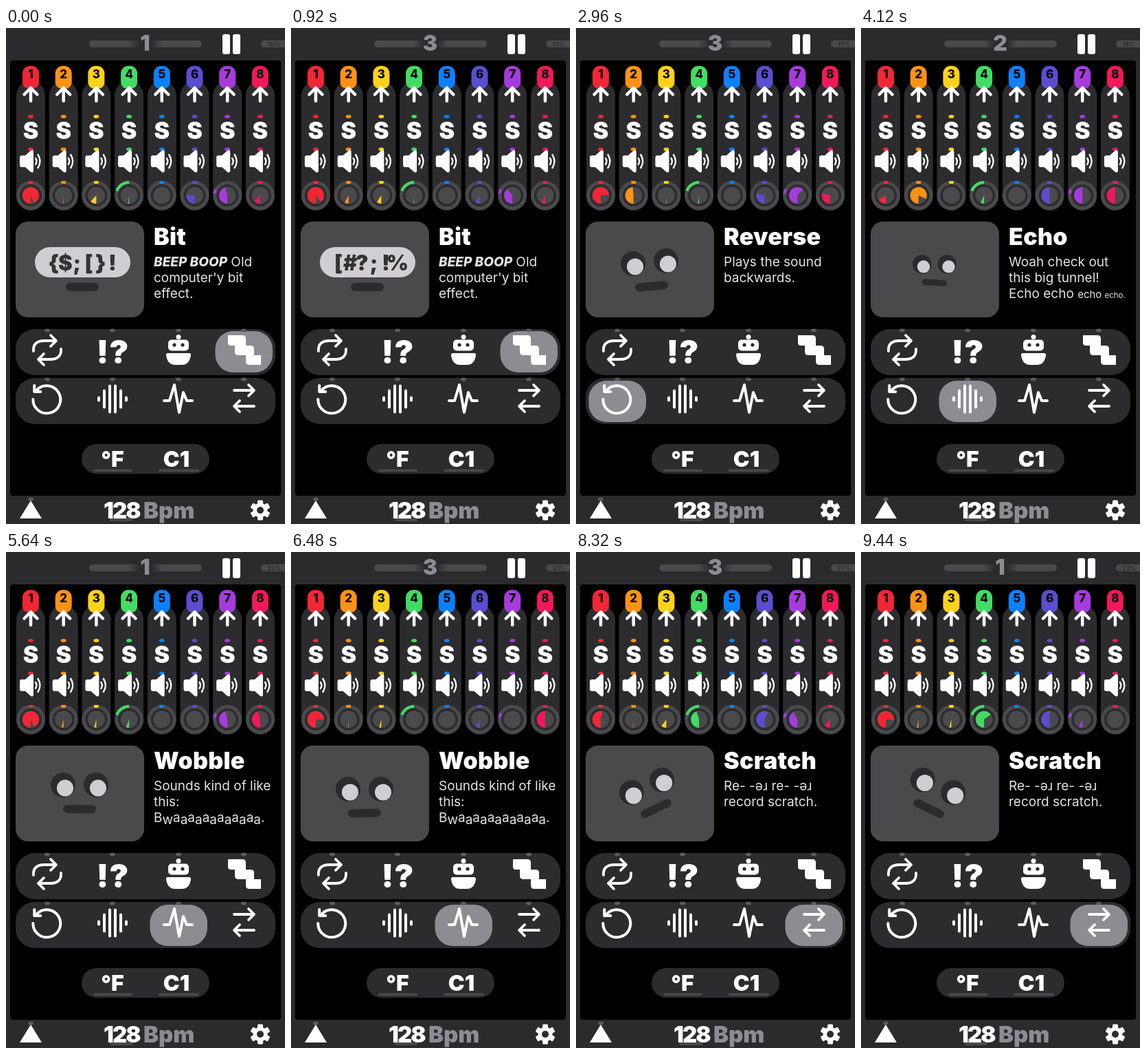
An HTML page with a canvas that plays this animation: 406 px wide and 720 px high, repeating every 9480 ms.

```html
<!DOCTYPE html>
<html lang="en">
<head>
<meta charset="utf-8">
<title>Voice effects mixer</title>
<style>
  html, body { margin: 0; width: 100%; height: 100%; overflow: hidden; background: #2b2b2d; }
  canvas { display: block; width: 406px; height: 720px; }
</style>
</head>
<body>
<canvas id="stage"></canvas>
<script>
const canvas = document.getElementById('stage');
const ratio = window.devicePixelRatio || 1;
canvas.width = 406 * ratio;
canvas.height = 720 * ratio;
const c = canvas.getContext('2d');

const LOOP = 9480, STEP = 40, BEAT = 60000 / 128, LEAD = 120, FLASH = 115;
const PANEL = '#2c2c2e', GREY = '#4a494c', DARK = '#2b2b2d', LIGHT = '#8e8c93', PALE = '#d0ced3';
const COLORS = ['#f22735', '#ff9215', '#ffd21a', '#43dc63', '#0d80ff', '#5b4dd0', '#a63bdd', '#f0195a'];
const PAN = [0, 0, 0, -70, 0, 0, -72, 0];
const BUTTON_X = [60, 155, 251, 346];
const TAU = Math.PI * 2;

// Meter readings of the eight channels, in percent, and the processor load
const METER_TIMES = [0, 1840, 4120, 5640, 6480, 8320, 9440];
const METERS = [
  [93, 1, 12, 2, 0, 25, 46, 12],
  [98, 12, 2, 0, 0, 0, 46, 2],
  [17, 82, 0, 7, 0, 50, 50, 50],
  [93, 4, 4, 6, 0, 0, 46, 46],
  [75, 1, 4, 0, 0, 7, 0, 50],
  [53, 1, 10, 45, 0, 57, 42, 12],
  [76, 3, 4, 65, 0, 50, 7, 0]
];
const LOAD = [10, 17, 18, 33, 31, 27, 23];

const inter = (size, weight = 400, style = '') => `${style} ${weight} ${size}px Inter, sans-serif`;
const heavy = size => inter(size, 900);
const BODY = inter(19);

// A line is a string or a list of [text, font, vertical shift]
const IDLE = { title: 'Pelbo', lines: ['Pelbo by Dorkum++', 'Version 0.3 ._.'] };
const EFFECTS = [
  { title: 'Bit', button: 3, lines: [
    [['BEEP BOOP', inter(19, 800, 'italic')], [' Old', BODY]], 'computer\'y bit', 'effect.'] },
  { title: 'Reverse', button: 4, lines: ['Plays the sound', 'backwards.'] },
  { title: 'Echo', button: 5, lines: ['Woah check out', 'this big tunnel!',
    [['Echo echo ', BODY], ['echo ', inter(15)], ['echo.', inter(11.5)]]] },
  { title: 'Wobble', button: 6, lines: ['Sounds kind of like', 'this:',
    [...'Bwaaaaaaaaaaaa.'].map((ch, i) => [ch, BODY, i % 2 * 3.5])] },
  { title: 'Scratch', button: 7, lines: ['Re- -ǝɹ re- -ǝɹ', 'record scratch.'] }
];

function box(x, y, w, h, r, color) {
  c.fillStyle = color;
  c.beginPath();
  c.roundRect(x, y, w, h, r);
  c.fill();
}

function oval(x, y, rx, ry, color, turn = 0) {
  c.fillStyle = color;
  c.beginPath();
  c.ellipse(x, y, rx, ry, turn, 0, TAU);
  c.fill();
}

function shape(d, color = '#fff') {
  c.fillStyle = color;
  c.fill(new Path2D(d));
}

function line(d, width = 4, color = '#fff') {
  c.strokeStyle = color;
  c.lineWidth = width;
  c.lineCap = c.lineJoin = 'round';
  c.stroke(new Path2D(d));
}

function text(str, x, y, font, color = '#fff', align = 'left', spacing = 0) {
  c.font = font;
  c.letterSpacing = spacing + 'px';
  c.fillStyle = color;
  c.textAlign = align;
  c.fillText(str, x, y);
}

function richLine(content, x, y) {
  const runs = typeof content === 'string' ? [[content, BODY]] : content;
  for (const [str, font, shift = 0] of runs) {
    text(str, x, y + shift, font, '#e4e4e6');
    x += c.measureText(str).width;
  }
}

const tick = (x, y, color) => oval(x, y, 4, 2.5, color);

function levelsAt(t) {
  let i = METER_TIMES.length - 1;
  while (METER_TIMES[i] > t) i--;
  const next = METERS[i + 1];
  if (!next) return { levels: METERS[i], load: LOAD[i] };
  const u = (t - METER_TIMES[i]) / (METER_TIMES[i + 1] - METER_TIMES[i]);
  const levels = METERS[i].map((v, ch) => {
    const sway = 0.3 * Math.sin(Math.PI * u) * Math.sin(t / BEAT * TAU + ch);
    return Math.min(98, Math.max(0, (v + (next[ch] - v) * u) * (1 + sway)));
  });
  return { levels, load: LOAD[i] };
}

function drawTop(beat, sinceBar, load) {
  const width = 164 + 120 * Math.sqrt(Math.max(0, 1 - sinceBar / LEAD));
  const fade = c.createLinearGradient(178, 0, 228, 0);
  [GREY, DARK, DARK, GREY].forEach((color, i) => fade.addColorStop(i / 3, color));
  box(203 - width / 2, 18, width, 10, 5, fade);
  text(beat, 202.5, 33, heavy(32), LIGHT, 'center');
  box(315, 9, 11, 29, 3, '#fff');
  box(330, 9, 11, 29, 3, '#fff');
  box(371, 18, 60, 10, 5, GREY);
  text(load + '%', 390, 26.5, inter(9, 600), DARK, 'center');
}

function drawKnob(x, color, pan, level, marker) {
  const y = 243, rad = deg => (deg - 90) * Math.PI / 180;
  oval(x, y, 21, 21, GREY);
  oval(x, y, 16, 16, PANEL);
  oval(x, y, 12.5, 12.5, GREY);
  c.fillStyle = color;
  c.beginPath();
  c.moveTo(x, y);
  c.arc(x, y, 12, Math.PI / 2, Math.PI / 2 + level / 100 * TAU);
  c.fill();
  c.strokeStyle = color;
  c.lineWidth = 4;
  c.lineCap = 'butt';
  c.beginPath();
  c.arc(x, y, 19, rad(pan - (marker ? 10 : 0)), rad(marker ? pan + 10 : 0));
  c.stroke();
}

function drawChannel(i, level) {
  const x = 36 + 47.7 * i, color = COLORS[i];
  box(x - 21, 77, 42, 188, 21, PANEL);
  box(x - 12, 55, 24, 33, [11, 11, 9, 9], color);
  text(i + 1, x, 72.5, inter(17, 800), '#000', 'center');
  tick(x, 128.5, color);
  text('S', x, 160.5, heavy(34), '#fff', 'center');
  tick(x, 176, color);
  drawKnob(x, color, PAN[i], level, i !== 3);
  c.save();
  c.translate(x, 0);
  line('M0 106V87M-9.5 96.500L0 87L9.5 96.500', 4.5);
  shape('M-16 188q0-3 3-3h5l8-7q4-2 4 2v27q0 4-4 2l-8-7h-5q-3 0-3-3z');
  line('M7 189q3 4.500 0 9M10.5 184q6 9.500 0 19', 2.4);
  c.restore();
}

function eye(x, y, rx, ry, dx, dy, turn = 0) {
  oval(x, y, rx, ry, DARK, turn);
  oval(x + dx, y + dy, rx * 0.67, ry * 0.67, PALE, turn);
}

function mouth(x, y, length, thick, turn) {
  c.save();
  c.translate(x, y);
  c.rotate(turn);
  box(-length / 2, -thick / 2, length, thick, thick / 2, DARK);
  c.restore();
}

function face(x, y, scale = 1, turn = 0, mouthTurn = turn) {
  const cos = Math.cos(turn) * scale, sin = Math.sin(turn) * scale;
  for (const side of [-24, 24])
    eye(x + side * cos, y + side * sin, 18 * scale, 18 * scale, 3 * scale, 4.5 * scale);
  mouth(x - 35 * sin, y + 35 * cos, 48 * scale, 12 * scale, mouthTurn);
}

function bitFace(t) {
  const glyphs = '{$;[}!#&%?', k = Math.floor(t / 80);
  box(42, 318, 139, 44, 22, PALE);
  for (let i = 0; i < 6; i++)
    text(glyphs[(i + k * (3 + 2 * i)) % 10], 69 + i * 17.2, 352, heavy(31), '#333', 'center');
  box(87, 370, 48, 12, 6, DARK);
}

function squashedFace() {
  eye(76, 350, 23, 13, -4, -2, 0.06);
  eye(124.5, 353, 15, 25, 5, -4, 0.08);
  mouth(97, 387.5, 48, 12, 0.15);
}

function drawFace(effect, beats, t) {
  const phase = TAU * beats;
  const wave = Math.cos(phase + 0.314);
  [
    () => bitFace(t),
    () => face(107, 340, 1, 0.2 * Math.sin(phase)),
    () => face(107, 343, 0.76 + 0.15 * Math.sin(phase - 0.283), 0, 0.06),
    () => face(107, 340.8 + 5 * wave, 1, 0, -0.03 * wave),
    () => face(107.5 - 4.8 * wave, 340, 1, -0.42 * wave, -0.48 * wave)
  ][effect]();
}

function drawIcons() {
  // loop
  line('M40 469q-1-15 16-15h17M65 446l8 8l-8 8M80 466q1 15-16 15h-17M55 473l-8 8l8 8', 3.8);
  text('!?', 155.5, 487, heavy(47), '#fff', 'center', 1);
  // robot
  oval(251, 448.5, 3.5, 3.5, '#fff');
  box(236, 452.5, 30, 16, 5, '#fff');
  oval(245, 460, 2.6, 2.6, PANEL);
  oval(257, 460, 2.6, 2.6, PANEL);
  shape('M235 472h32q2 0 2 3q-2 14-13 14h-10q-11 0-13-14q0-3 2-3z');
  // stairs
  shape('M323 446h21q5 0 5 5v10h7q5 0 5 5v9h10v14h-17q-5 0-5-5v-9h-11q-5 0-5-5v-9h-6q-4 0-4-4z');
  // rewind
  line('M45.300 525A20 20 0 1 1 39.300 539M41.300 519v9h9');
  [8, 28, 42, 42, 28, 8].forEach((h, i) =>
    box(133 + i * 8, 538.5 - h / 2, 4, h, 2, '#fff'));
  line('M230 541h8L245 518L252 558L258 529L263 541h8');
  line('M332 526h28M353 518l8 8l-8 8M361 549h-28M340 541l-8 8l8 8', 3.8);
}

function drawButtons(active) {
  for (const y of [437, 508]) box(14, y, 378, 67, 28, PANEL);
  if (active >= 0)
    box(BUTTON_X[active % 4] - 41.5, active < 4 ? 440 : 512, 83.5, 60, 26, LIGHT);
  for (const y of [439, 510]) for (const x of BUTTON_X) tick(x, y, '#5c5b60');
  drawIcons();
}

function drawBottom() {
  box(110, 604, 186, 43, 21.5, PANEL);
  text('°F', 155, 636.5, heavy(32), '#fff', 'center');
  text('C1', 248, 636.5, heavy(32), '#fff', 'center');
  box(127, 640.5, 57, 3.5, 1.7, GREY);
  box(222, 640.5, 59, 3.5, 1.7, GREY);

  tick(36, 684, '#5c5b60');
  shape('M36 686L52 712H20z');
  box(151, 711, 33, 5, 2.5, GREY);
  text('128', 142, 711.5, heavy(33), '#fff', 'left', -2);
  text('Bpm', 200, 711.5, heavy(33), LIGHT);
  c.save();
  c.translate(370, 700);
  for (let i = 0; i < 6; i++) {
    box(-4, -14.5, 8, 8, 1.5, '#fff');
    c.rotate(TAU / 6);
  }
  oval(0, 0, 10.5, 10.5, '#fff');
  oval(0, 0, 5, 5, DARK);
  c.restore();
}

function draw(t) {
  const beats = (t + LEAD) / BEAT;
  const bar = Math.floor(beats / 4);
  const sinceBar = t + LEAD - bar * 4 * BEAT;
  const current = Math.min(bar, 4);
  const switching = bar > 0 && bar < 5 && sinceBar < FLASH;
  const { levels, load } = levelsAt(t);

  c.setTransform(ratio, 0, 0, ratio, 0, 0);
  c.fillStyle = DARK;
  c.fillRect(0, 0, 406, 720);
  box(6, 47, 394, 632, 4, '#000');
  drawTop(Math.floor(beats) % 4 + 1, sinceBar, load);
  levels.forEach((level, i) => drawChannel(i, level));

  box(14, 281, 187, 139, 18, GREY);
  if (switching) squashedFace();
  else drawFace(current, beats, t);

  const info = switching ? IDLE : EFFECTS[current];
  c.globalAlpha = switching ? 1 - sinceBar / FLASH : 1;
  text(info.title, 215, 314.5, heavy(34), '#fff', 'left', 0.3);
  info.lines.forEach((content, i) => richLine(content, 215, 345.5 + i * 23));
  c.globalAlpha = 1;

  drawButtons(switching ? -1 : EFFECTS[current].button);
  drawBottom();
}

const start = performance.now();
function frame() {
  const t = (performance.now() - start) % LOOP;
  draw(Math.floor(t / STEP) * STEP);
  requestAnimationFrame(frame);
}
frame();
</script>
</body>
</html>
```
